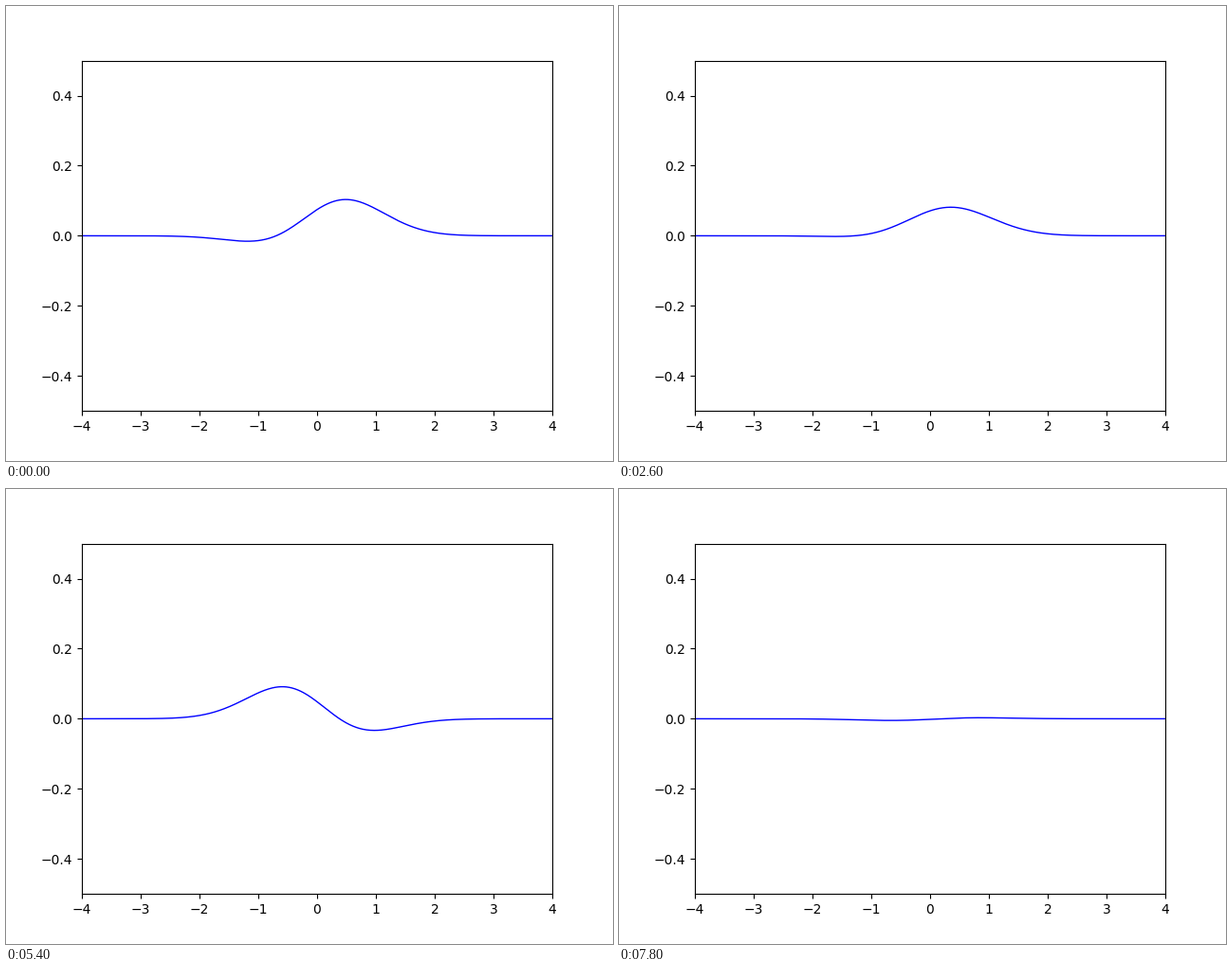
Recreate the animation shown at these times as a matplotlib script. Size 640 by 480 pixels, loop 8000 ms.

```python
import matplotlib.pyplot as plt
import numpy as np
from matplotlib.animation import FuncAnimation

FRAMES = 40
INTERVAL = 200  # ms

K = np.sqrt(3)   # oscillator stiffness, sets the packet width
AMP = 0.077

x = np.linspace(-4, 4, 500)
ground = AMP * np.exp(-K * x**2 / 2)
excited = np.sqrt(2 * K) * x * ground


def wave(i):
    """Real part of an equal mix of the two lowest oscillator states."""
    phase = 0.241 + 0.000887 * i**2
    return ground * np.cos(phase) + excited * np.cos(3 * phase)


fig, ax = plt.subplots(figsize=(6.4, 4.8), dpi=100)
ax.set_xlim(-4, 4)
ax.set_ylim(-0.5, 0.5)
line, = ax.plot(x, wave(0), color="blue", lw=1)


def update(i):
    line.set_ydata(wave(i))
    return line,


anim = FuncAnimation(fig, update, frames=FRAMES, interval=INTERVAL,
                     repeat=True, repeat_delay=0)
plt.show()
```
